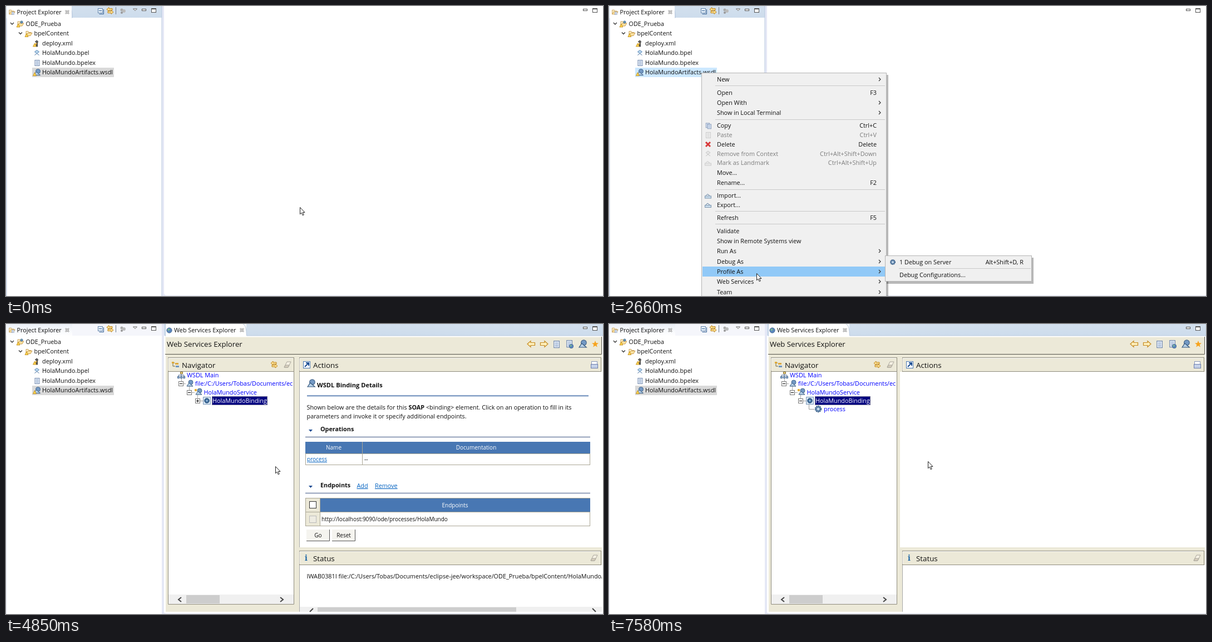
Write an HTML page that moves like this. It is 1073 px wide and 522 px high and loops after 8000 ms.

```html
<!DOCTYPE html>
<html lang="en">
<head>
<meta charset="utf-8">
<title>Testing a web service</title>
<style>
  html, body { margin: 0; width: 100%; height: 100%; overflow: hidden; background: #fff; }
  svg { display: block; width: 1073px; height: 522px; }
  text { font-family: "Open Sans", "Noto Sans", sans-serif; font-size: 10.83px; white-space: pre; }
</style>
</head>
<body>
<svg id="stage" viewBox="0 0 1073 522" xmlns="http://www.w3.org/2000/svg"></svg>
<script>
const LOOP = 8000;

// Drawing helpers; text is placed by its vertical centre.
const text = (x, cy, s, { fill = '#111', size = 10.83, extra = '' } = {}) =>
  `<text x="${x}" y="${cy + size * 0.36}" fill="${fill}" style="font-size:${size}px" ${extra}>${s}</text>`;
const rect = (x, y, w, h, fill, extra = '') =>
  `<rect x="${x}" y="${y}" width="${w}" height="${h}" fill="${fill}" ${extra}/>`;
const box = (x, y, w, h, fill, stroke) =>
  rect(x + 0.5, y + 0.5, w - 1, h - 1, fill, `stroke="${stroke}"`);
const path = (d, stroke, fill = 'none', width = 1) =>
  `<path d="${d}" stroke="${stroke}" fill="${fill}" stroke-width="${width}"/>`;
const at = (x, y, body, scale = 1) => `<g transform="translate(${x} ${y}) scale(${scale})">${body}</g>`;
const group = (id, body) => `<g id="${id}">${body}</g>`;
const clip = (id, body) => `<g clip-path="url(#${id})">${body}</g>`;
const bold = 'font-weight="700"';
const middle = 'text-anchor="middle"';

// Icons, each centred on its own origin.
const warning = at(-4, 3, path('M0-3 3 3H-3Z', '#b98a1c', '#ffd34d', 0.8));
const icon = {
  folder: path('M-5 4V-4h4l1 2h4v2', '#c69a52', '#fdf0c6', 0.9) + path('M-5 4l3-5h8l-3 5z', '#c8984a', '#fbe2a0', 0.9),
  globe: '<circle r="4.6" fill="#5b86bd" stroke="#41658f"/>' + path('M-3-2q2-2 4 0l-1 2-2 1zM1 2l2-1', 'none', '#82bf8d'),
  page: box(-4, -5, 9, 11, '#f7faff', '#7188ad') + path('M-2-2.5h5M-2-.5h5M-2 1.5h5M-2 3.5h5', '#86a1c9'),
  bpel: path('M-4 4 0 1 4 4M0 1V-1', '#466f9e') + path('M0-5 4-2 0 1-4-2z', '#5483b5', '#b9d7ed'),
  tool: path('M-1 6V-1L-3-3 0-5 2-3 1 0V6z', '#333', '#666') + path('M-4 3 0 0', '#dba735', 'none', 2),
  service: at(2, -2, '<circle r="4" fill="#7399c4" stroke="#48688d"/>') + path('M-5 5-1-1 6 5z', '#35577c', '#b7d1e8'),
  arrow: path('M-7 0-1-5.5V-2.5H6.5V2.5H-1V5.5Z', '#c58a20', '#fff0bb', 1.2),
  star: path('M0-6 1.6-1.8 6-1.6 2.5 1.2 3.8 5.5 0 3-3.8 5.5-2.5 1.2-6-1.6-1.6-1.8Z', 'none', '#f7a31c'),
  eraser: path('M-6 5-1-5H6L1 5Z', '#a9a59b', '#f5f1e4') + path('M-6 5l2-4h7l-2 4z', '#a9a59b', '#d7cfbd'),
  refresh: path('M-6-2.5-2-6V-4H4V-1H-2V1Z', '#bd841b', '#ffe294') + path('M6 2.5 2-1V1H-4V4H2V6Z', '#bd841b', '#ffe294'),
  close: path('M-3-3 3 3M-3 3 3-3', '#777', 'none', 2.4) + path('M-3-3 3 3M-3 3 3-3', '#fff', 'none', 1),
  gear: '<circle r="5" fill="#7295b9" stroke="#3e628a" stroke-width="2.5" stroke-dasharray="2.2 1"/><circle r="2" fill="#d9e7f4"/>',
  binding: box(-7, -7, 14, 14, '#d9e7f4', '#7b98b8') + '<circle r="4.2" fill="#3d6c9c" stroke="#244a73"/><circle r="1.6" fill="#9fc2e0"/>',
  sitemap: path('M0-2V2M-5 3V0H5V3', '#536f91') + box(-2, -6, 5, 4, '#ffe18a', '#8b7032') +
    [-7, -2, 3].map(x => box(x, 2, 4, 4, '#9dbde0', '#49698f')).join(''),
  delete: path('M-4-4 4 4M-4 4 4-4', '#d8393a', 'none', 3),
  tray: box(-6, 0, 12, 5, '#c9dcec', '#7d96ae') + path('M-4 0-1-3 3 0', '#58799e'),
  minmax: box(-12, -3, 8, 4, '#fff', '#555') + box(5, -4, 9, 8, '#fff', '#555') + path('M5-2.5h9', '#555'),
};
const toggleBox = (x, y, plus) => box(x - 4, y - 4, 9, 9, '#fff', '#777') +
  path(`M${x - 2} ${y + 0.5}h5${plus ? `M${x + 0.5} ${y - 2}v5` : ''}`, '#000');
const chevron = (x, y, right, color = '#444', w = 2) =>
  path(right ? `M${x - 3} ${y - 4}l5 4-5 4` : `M${x + 3} ${y - 4}l-5 4 5 4`, color, 'none', w);

function projectPanel() {
  const item = (x, y, name, glyph, warn) => at(x - 9.5, y, glyph + (warn ? warning : '')) + text(x, y, name);
  const twisty = (x, y) => path(`M${x - 3} ${y - 2}l3 3 3-3`, '#333', 'none', 1.3);
  return rect(0, 0, 1073, 522, '#e5e8f6') + rect(1, 0, 279, 522, '#fff') +
    group('headerActive', rect(0, 0, 280, 21, 'url(#strip)') +
      path('M0 0H112Q119 1 119.5 21H1V522M280 0V522', '#b9c9de', 'none') + rect(1, 0, 117, 22, '#fff')) +
    group('headerIdle', rect(0, 0, 280, 21, '#f5f6fb') + rect(1, 0, 118, 22, 'url(#idle)')) +
    at(10.5, 11, icon.folder, 0.95) + at(12, 13, icon.page, 0.5) + text(19.5, 11.5, 'Project Explorer') + at(110, 11, icon.close) +
    box(165, 4, 9, 9, '#e6f0fa', '#6787ad') + path('M167 8.5h5M175.5 6v8.5h-8', '#315f94') +
    at(187, 8.5, icon.refresh) + path('M197.5 2v13', '#6c7c90') +
    '<circle cx="208" cy="7" r="2.5" fill="#aaa"/><circle cx="212" cy="9" r="3" fill="#bbb"/><circle cx="208" cy="12" r="2" fill="#999"/>' +
    path('M228.5 5h7l-3.5 3.5z', '#666', '#fff') + at(256, 8, icon.minmax) +
    rect(47, 111, 147, 17, '#d9d9d9', 'id="selection"') +
    twisty(11, 32) + twisty(26, 49.5) +
    item(35.5, 32, 'ODE_Prueba', icon.folder + at(2, -3, icon.globe, 0.5), true) +
    item(50.5, 49.5, 'bpelContent', icon.folder, true) +
    item(65, 67, 'deploy.xml', icon.tool, true) + item(65, 84.5, 'HolaMundo.bpel', icon.bpel) +
    item(65, 102, 'HolaMundo.bpelex', icon.page) + item(65, 119.5, 'HolaMundoArtifacts.wsdl', icon.service, true);
}

const toolbar = () => rect(286, 24, 785, 31, '#ece9d8') + path('M286 24.5H1070M286.5 24V55', '#f8f6ec') +
  path('M286 55.5H1070.5V24', '#55534a') + text(289, 37.5, 'Web Services Explorer', { size: 13.2 }) +
  at(944, 37, icon.arrow) + at(967, 37, `<g transform="scale(-1 1)">${icon.arrow}</g>`) +
  at(989, 37, icon.page, 1.2) + at(1012, 36, icon.page, 1.2) + at(1016, 41, icon.globe, 0.8) +
  at(1036, 37, icon.service, 1.2) + at(1059, 37, icon.star);

const titleBar = (x, y, w, name, glyph, right) => box(x, y, w, 26, '#ece9d8', '#8f8c7e') +
  path(`M${x + 1} ${y + 24}V${y + 1.5}H${x + w - 2}`, '#fff') + at(x + 13, y + 13, glyph) +
  text(x + 25, y + 14.5, name, { size: 13.35 }) + right;

function navigator() {
  const link = (x, y, s, fill = '#00f') => text(x, y, s, { fill });
  return rect(291, 86, 227, 419, '#fff') + path('M291.5 86V504.5H517.5V86', '#8f8c7e') +
    titleBar(291, 60, 227, 'Navigator', path('M-6-3h5M-4-2V3H0', '#6d6545') + rect(-6, -5, 4, 3, '#e0a934') +
      rect(0, -3, 6, 3, '#dda93e') + rect(1, 2, 6, 3, '#6e96c3'),
      at(482, 73, icon.refresh) + at(506, 73, icon.eraser)) +
    path('M315.5 98V107M329.5 112V123M344.5 127V138M318 107.5h5M333 123.5h6M348 138.5h6', '#aaa') +
    at(315, 92, icon.sitemap) + link(325, 92, 'WSDL Main') +
    toggleBox(314, 107) + at(330, 107, icon.service) +
    clip('navClip', link(340, 107.5, 'file:/C:/Users/Tobas/Documents/eclipse-jee')) +
    toggleBox(329, 123) + at(346, 122, icon.service) + rect(339, 117, 4, 4, '#e6b13c') + link(355.5, 123, 'HolaMundoService') +
    at(361, 138, icon.binding) + rect(370, 130, 100, 16, '#000080') +
    rect(370.5, 130.5, 99, 15, 'none', 'stroke="#d8d8a0" stroke-dasharray="1 1"') + link(371, 138.5, 'HolaMundoBinding', '#fff') +
    group('collapsed', toggleBox(344, 138, true)) +
    group('expanded', toggleBox(344, 138) + path('M359.5 145V153.5H369', '#999') +
      at(376, 153, icon.gear) + link(386, 153.5, 'process')) +
    rect(292, 487, 225, 17, '#f0f0f0') + rect(324, 488, 60, 15, '#cdcdcd') +
    chevron(312, 496, false) + chevron(496, 496, true);
}

function bindingDetails() {
  const small = (x, y, s, fill, extra) => text(x, y, s, { fill, extra, size: 10 });
  const link = (x, y, s, size = 10.83) => text(x, y, s, { fill: '#0563c1', size, extra: 'text-decoration="underline"' });
  const section = (y, name) => path(`M544 ${y}h7l-3.5 4z`, 'none', '#174a91') +
    text(565, y - 0.5, name, { extra: bold }) + rect(538, y + 12.5, 512, 2, '#929fb9');
  const button = (x, w, s) => rect(x, 370, w, 21, '#f5f4ef') + path(`M${x} 390.5h${w - 0.5}V370`, '#555') +
    small(x + w / 2, 380.5, s, '#111', middle);
  return rect(522, 86, 5, 316, '#ece9d8') + path('M527.5 86V402', '#aaa') +
    at(548, 107, icon.service, 1.2) + text(559, 110.5, 'WSDL Binding Details', { size: 11.1, extra: bold }) +
    rect(541, 128, 506, 2.5, '#849fc6') +
    text(540.5, 150.5, 'Shown below are the details for this <tspan font-weight="700">SOAP</tspan> &lt;binding&gt; element. Click on an operation to fill in its') +
    text(540.5, 166, 'parameters and invoke it or specify additional endpoints.') +
    section(190, 'Operations') +
    box(538, 212, 512, 42, '#fff', '#aaa695') + rect(538, 212, 512, 21, '#4877b3') +
    path('M538 233.5H1050M640.5 212V254', '#aaa695') +
    small(589, 222.5, 'Name', '#fff', middle) + small(845, 222.5, 'Documentation', '#fff', middle) +
    link(541, 243.5, 'process', 10) + small(644, 243.5, '--') +
    section(291, 'Endpoints') + link(630.5, 291, 'Add') + link(663, 291, 'Remove') +
    box(538, 313, 512, 51, '#fff', '#aaa695') + rect(539, 314, 25, 49, '#ece9d8') + rect(564, 314, 486, 24, '#4877b3') +
    path('M538 338.5H1050M564.5 313V363', '#aaa695') +
    box(545, 319, 13, 13, '#fff', '#333') + box(545, 345, 13, 13, '#eeece2', '#bbb') +
    small(807, 326, 'Endpoints', '#fff', middle) +
    small(567, 351, 'http://localhost:9090/ode/processes/HolaMundo') +
    button(540, 42, 'Go') + button(586, 42, 'Reset');
}

const statusMessage = () =>
  clip('statusClip', text(540.5, 454, 'IWAB0381I file:/C:/Users/Tobas/Documents/eclipse-jee/workspace/ODE_Prueba/bpelContent/HolaMundoArtifacts.wsdl')) +
  rect(528, 509, 543, 9, '#f0f0f0') + rect(560, 510, 357, 8, '#cdcdcd') +
  path('M552 512l-6 6M1054 512l6 6', '#444', 'none', 2);

const explorer = () => rect(284, 0, 789, 21, 'url(#strip)') + rect(284, 21, 788, 499, '#fff') +
  rect(286, 0, 146, 22, '#fff') + path('M286.5 22V0M426 0Q432 1 432.5 21H1073', '#b9c9de') +
  at(293.5, 11.5, icon.globe) + text(302, 11.5, 'Web Services Explorer') + at(424, 11, icon.close) +
  `<g transform="translate(0 -1)">${toolbar()}</g>` + rect(287, 55, 784, 463, '#ece9d8') +
  navigator() + rect(523, 86, 548, 316, '#fff') + rect(527, 434, 544, 84, '#fff') +
  path('M527.5 434V518', '#aaa') +
  titleBar(527, 60, 543, 'Actions', box(-6, -6, 13, 13, '#fff', '#4877b3') + path('M-3 4 3-2M-1-3H4V2', '#174a91', 'none', 2),
    box(1052, 67, 11, 6, '#fff', '#8896b8') + box(1051, 72, 13, 8, '#c4d0e8', '#6e7fae')) +
  titleBar(527, 408, 543, 'Status', '<text x="-3" y="5" fill="#1763a5" font-weight="700" style="font-family:\'Noto Serif\',serif;font-size:14px">i</text>',
    at(1057, 421, icon.eraser)) +
  group('details', bindingDetails()) + group('message', statusMessage());

// Menu rows: centre, label, shortcut ('>' opens a submenu), disabled, icon.
const sheets = at(-1, -1, icon.page, 0.8) + at(2, 1, icon.page, 0.8);
const faded = body => `<g opacity=".35" style="filter:grayscale(1)">${body}</g>`;
const rows = [
  [132, 'New', '>'], [156, 'Open', 'F3'], [174, 'Open With', '>'], [192, 'Show in Local Terminal', '>'],
  [215.5, 'Copy', 'Ctrl+C', 0, sheets], [232, 'Paste', 'Ctrl+V', 1, faded(icon.page)],
  [249, 'Delete', 'Delete', 0, icon.delete], [266, 'Remove from Context', 'Ctrl+Alt+Shift+Down', 1, faded(icon.bpel)],
  [282.5, 'Mark as Landmark', 'Ctrl+Alt+Shift+Up', 1, faded(icon.tray)],
  [300, 'Move...'], [318.5, 'Rename...', 'F2'], [341.5, 'Import...', '', 0, icon.tray], [358, 'Export...', '', 0, icon.tray],
  [381, 'Refresh', 'F5'], [405, 'Validate'], [423, 'Show in Remote Systems view'], [441, 'Run As', '>'],
  [460, 'Debug As', '>'], [478, 'Profile As', '>'], [496, 'Web Services', '>'], [515, 'Team', '>'],
];
const webServices = rows[19];
const popup = (x, y, w, h) => rect(x + 3, y + 4, w, h, '#000', 'opacity=".28"') + box(x, y, w, h, '#f0f0f0', '#b4b4b4');

const menu = () => popup(166, 120, 333, 420) + rect(168, 0, 328, 18, '#91c9f7', 'id="hover"') +
  [143, 204, 330, 369, 392].map(y => path(`M191 ${y + 0.5}H496`, '#c9c9c9')).join('') +
  rows.map(([y, label, key = '', disabled, glyph]) => {
    const fill = disabled ? '#7c7c7c' : '#111';
    return (glyph ? at(178, y, glyph) : '') + text(194, y, label, { fill }) +
      (key === '>' ? path(`M485 ${y - 3}l3 3-3 3`, '#333', 'none', 1.2) : text(481, y, key, { fill, extra: 'text-anchor="end"' }));
  }).join('');
const debugMenu = () => popup(496, 449, 264, 47) + at(510, 461, icon.gear, 0.8) + text(522, 461, '1 Debug on Server') +
  text(745, 461, 'Alt+Shift+D, R', { extra: 'text-anchor="end"' }) + path('M521 472.5H758', '#c9c9c9') + text(522, 484, 'Debug Configurations...');
const webMenu = () => popup(496, 485, 231, 60) + rect(498, 487, 227, 18, '#91c9f7', 'id="subHover"') +
  text(522, 496.5, 'Test with Web Services Explorer') + text(522, 515, 'Publish WSDL File');

const stage = document.getElementById('stage');
stage.innerHTML = `<defs>
  <linearGradient id="strip" x2="0" y2="1"><stop stop-color="#d3e0ee"/><stop offset="1" stop-color="#cddcec"/></linearGradient>
  <linearGradient id="idle" x2="0" y2="1"><stop stop-color="#edf1f8"/><stop offset="1" stop-color="#fff"/></linearGradient>
  <clipPath id="navClip"><rect x="292" y="86" width="224" height="400"/></clipPath>
  <clipPath id="statusClip"><rect x="528" y="434" width="543" height="84"/></clipPath></defs>` +
  projectPanel() + path('M284 0H1073V521H289Q284 521 284 516Z', 'none', '#fff') +
  group('loading', toolbar()) + group('explorer', explorer()) + at(1049, 8, icon.minmax) +
  group('menu', menu()) + group('debugMenu', debugMenu()) + group('webMenu', webMenu()) +
  group('pointer', group('arrow', path('M.5 .5V12.8L3.2 10.2 5.2 14.8 7.2 14 5.3 9.5H9Z', '#222', '#fff')) +
    group('hand', path('M-1.5 11V1.5Q0-.5 1.5 1.5V6Q3 4.5 4 6.5 5.5 5.5 6.5 7 9 6.5 9 9V13L7.5 17.5H-.5L-4.5 11.5Q-4.5 8.5-1.5 11Z', '#222', '#fff')));

const parts = Object.fromEntries([...stage.querySelectorAll('[id]')].map(e => [e.id, e]));
const show = (id, on) => { parts[id].style.display = on ? '' : 'none'; };

// Bursts of screen updates: start, end, count.
const bursts = [[320, 1090, 11], [1170, 1880, 10], [2190, 2800, 9], [3030, 3820, 11], [3900, 4700, 10],
  [4770, 5540, 11], [5620, 5620, 1], [5770, 6410, 9], [6550, 6550, 1], [6790, 7270, 7], [7430, 7580, 3]];
function snap(t) {
  let snapped = 0;
  for (const [start, end, count] of bursts) {
    if (t < start) break;
    const step = (end - start) / (count - 1) || 0;
    snapped = step ? start + Math.min(count - 1, Math.floor((t - start + 15) / step)) * step : start;
  }
  return snapped;
}

// Pointer path: time, x, y.
const route = [[243, 528, 362], [480, 480, 318], [720, 320, 205], [940, 200, 130], [1090, 166, 118], [1250, 166, 119],
  [1500, 215, 270], [1640, 255, 390], [1801, 273, 447], [1880, 276, 455], [2110, 276, 455], [2800, 262, 488],
  [2950, 262, 488], [3504, 473, 502], [3820, 561, 498], [4433, 561, 498], [4700, 505, 322], [4847, 484, 256],
  [5200, 385, 175], [5540, 341, 138], [5690, 341, 137], [6170, 400, 166], [6410, 395, 143], [6480, 395, 143],
  [6550, 403, 147], [6710, 403, 147], [7270, 574, 247], [7430, 574, 247], [7505, 573, 247]];
function pointerAt(t) {
  const next = route.findIndex(k => k[0] > t);
  if (next === 0) return route[0].slice(1);
  if (next < 0) return route.at(-1).slice(1);
  const a = route[next - 1], b = route[next], p = (t - a[0]) / (b[0] - a[0]);
  return [a[1] + (b[1] - a[1]) * p, a[2] + (b[2] - a[2]) * p].map(Math.round);
}

function render(time) {
  const t = snap(time), within = (a, b) => t >= a && t < b;
  const [x, y] = pointerAt(t);
  parts.pointer.setAttribute('transform', `translate(${x} ${y})`);
  const hand = within(5600, 5800) || within(6400, 6800) || within(7190, 7500);
  show('hand', hand);
  show('arrow', !hand);

  parts.selection.setAttribute('fill', within(1080, 4050) ? '#cce8ff' : '#d9d9d9');
  show('headerActive', t < 4150);
  show('headerIdle', t >= 4150);

  show('menu', within(1240, 3890));
  show('debugMenu', within(2330, 3180));
  show('webMenu', within(3330, 3890));
  const row = x > 496 ? webServices : rows.find(r => !r[3] && Math.abs(r[0] - y) <= 9 && x >= 168);
  show('hover', row);
  if (row) parts.hover.setAttribute('y', Math.round(row[0]) - 9);
  show('subHover', x > 498);

  show('loading', within(4240, 4765));
  show('explorer', t >= 4765);
  const open = t >= 5840;
  show('collapsed', !open);
  show('expanded', open);
  show('details', t < 5900 || within(6320, 7425));
  show('message', t < 5900);
}

function tick(now) {
  render(now % LOOP);
  requestAnimationFrame(tick);
}
render(0);
requestAnimationFrame(tick);
</script>
</body>
</html>
```
